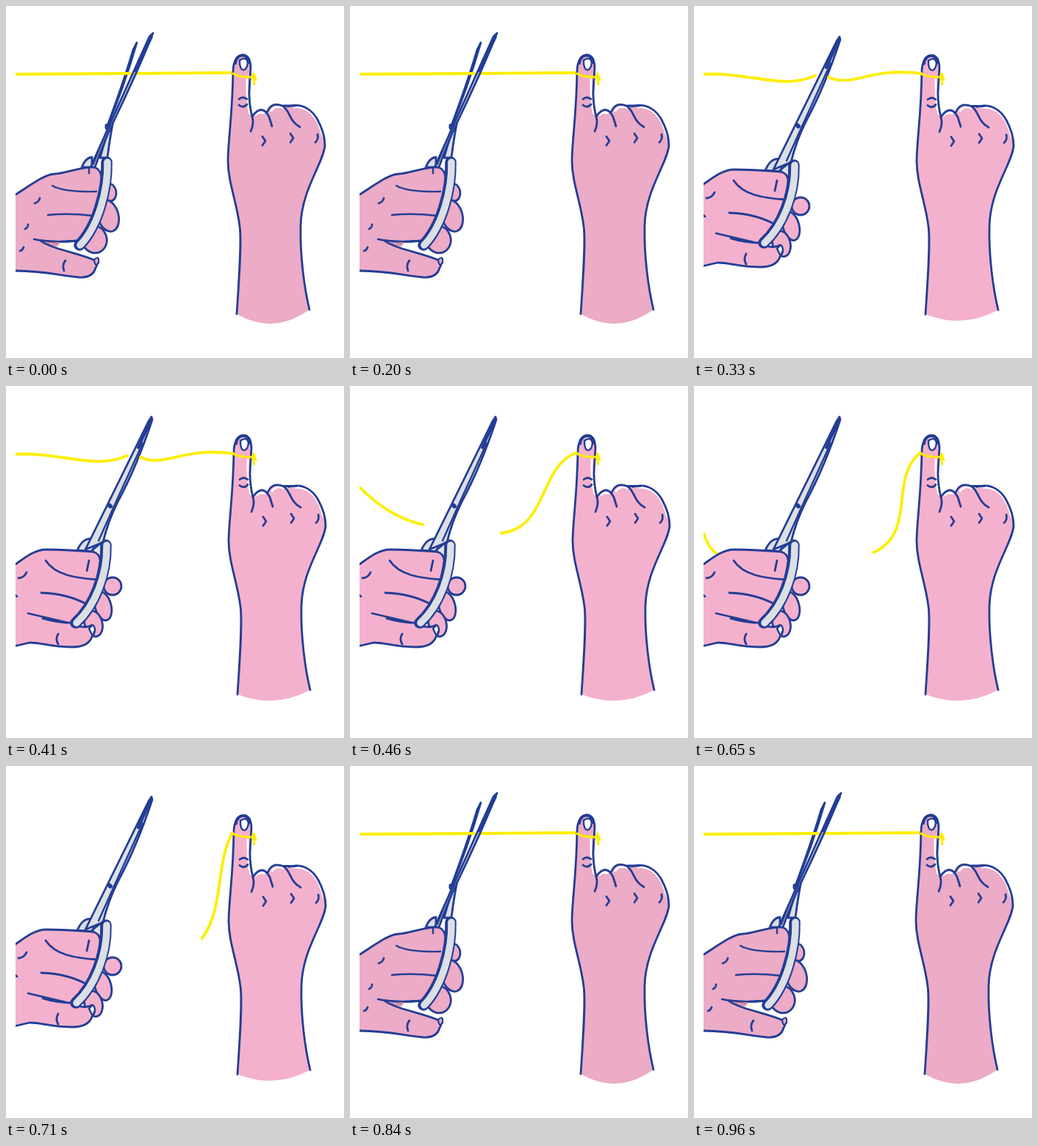
An HTML page that plays this animation: 460x480 px, repeating every 1.04 s.

```html
<!DOCTYPE html>
<html lang="en">
<head>
<meta charset="utf-8">
<title>Cutting the thread</title>
<style>
html, body { margin: 0; width: 100%; height: 100%; overflow: hidden; background: #fff; }
svg { display: block; width: 460px; height: 480px; stroke-linecap: round; stroke-linejoin: round; }
</style>
</head>
<body>
<svg viewBox="0 0 460 480">
  <defs><clipPath id="crop"><rect x="13" width="447" height="480"/></clipPath></defs>
  <g id="art" clip-path="url(#crop)"></g>
</svg>
<script>
const INK = '#233d94', STEEL = '#dcdfe5', YELLOW = '#fdee00';
const OPEN_SKIN = '#ecabc6', SHUT_SKIN = '#f4b1cd', SHADE = '#d08fac';

const line = (d, width = 2.8, color = INK) =>
  `<path d="${d}" fill="none" stroke="${color}" stroke-width="${width}"/>`;
const fill = (d, color) => `<path d="${d}" fill="${color}"/>`;
const shape = (d, color, width = 2.8) => fill(d, color) + line(d, width);
const thread = d => line(d, 3.8, YELLOW);

// Short bent stroke from (x, y) to (x + dx, y + dy).
const crease = (x, y, dx, dy, bend = 0) =>
  line(`M${x} ${y}q${dx / 2 - dy * bend} ${dy / 2 + dx * bend} ${dx} ${dy}`);

const finger = (x, y, rx, ry, turn, skin) =>
  `<ellipse cx="${x}" cy="${y}" rx="${rx}" ry="${ry}" transform="rotate(${turn} ${x} ${y})"
    fill="${skin}" stroke="${INK}" stroke-width="2.8"/>`;

// Steel band with an ink border, heavier on its inner side.
const grip = d =>
  line(d, 15.5) + `<g transform="translate(1 0)">${line(d, 9.5, STEEL)}</g>`;

function pointingHand(skin, bottom) {
  const left = 'M314 420C317 375 321 320 318 300C314 267 302 240 302 210C303 175 308 150 309 90';
  const tip = 'C309 60 333 60 333 84L331 118Q331 135 335 151';
  const knuckles = 'Q346 136 357 149Q358 126 384 137';
  const edge = 'C405 131 418 144 424 155C431 168 434 178 434 190C432 215 402 250 401 300C400 340 406 385 413 414';
  return fill(`${left}${tip}${knuckles}${edge}Q364 ${2 * bottom - 418} 314 420`, skin) +
    line('M328 100Q327 130 332 147M339 149Q344 144 351 146M361 143Q366 135 378 139M392 138Q421 136 431 178', 2.6, '#fff') +
    line(left + tip) +
    line('M384 137' + edge) +
    line('M333 171Q338 160 335 151Q348 132 358 151L362 164M355 146Q360 130 376 136C387 142 384 156 400 165M378 136L394 136') +
    line('M312 78C313 64 331 64 331 77', 4) +
    shape('M318 74C317 91 328 91 329 77Q327 68 318 74Z', '#fff', 2.4) +
    crease(317, 127, 11, 0, -0.4) + crease(317, 135, 11, -1, 0.5) +
    [[349, 178], [387, 174]].map(([x, y]) => line(`M${x} ${y}l4 6l-4 6`)).join('') +
    crease(424, 175, -3, 11, -0.3);
}

const knot = line('M309 92Q315 97 335 97L337 92L340 101M336 97L338 107', 3, YELLOW);

function openScissors(strand) {
  const skin = OPEN_SKIN;
  return finger(141, 254, 9, 12, -10, skin) +
    finger(139, 286, 14, 22, -15, skin) +
    finger(120, 318, 17, 19, -20, skin) +
    shape('M178 50Q159 115 137 166Q160 104 173 60Z', STEEL) +
    strand +
    shape('M147 152Q142 175 138 207H128Q135 180 147 152Z', STEEL) +
    shape('M103 220Q108 207 117 206V220Z', STEEL) +
    shape('M200 37Q181 85 150 150Q135 180 121 220H115L195 42Z', STEEL) +
    line('M198 42L176 88', 4) + line('M144 152L119 216', 2) + line('M137 163V166', 5) +
    shape('M10 259C30 247 50 230 66 229S105 218 120 220Q132 223 130 245C127 280 115 300 98 320Q70 323 47 320C65 332 95 336 119 346Q127 350 122 357Q118 371 100 370C70 367 50 361 10 361Z', skin) +
    fill('M50 321H76L68 329Z', SHADE) +
    shape('M120 346Q127 339 126 350Q121 357 120 346Z', skin, 2.2) +
    line('M38 318Q60 323 98 320M63 245Q78 254 123 253M57 285Q85 282 118 286M113 221V228', 2.4) +
    crease(46, 262, -7, 7, -0.3) + crease(30, 298, -4, 6, -0.3) +
    crease(24, 329, -5, 5, -0.3) + crease(81, 347, -2, 14, 0.3) +
    grip('M137 213C138 250 125 300 100 326');
}

function shutScissors() {
  const skin = SHUT_SKIN;
  return finger(145, 273, 12, 12, 0, skin) +
    finger(132, 300, 11, 20, -15, skin) +
    finger(119, 324, 12, 18, -15, skin) +
    shape('M97 224Q105 205 119 209V226Z', STEEL) +
    shape('M198 42L194 48L108 223L132 213Q139 184 152 158Q178 110 199 46Z', STEEL) +
    line('M198 44L180 84', 4) + line('M186 78L147 164L126 211', 2.4) + line('M141 163L142 164', 6) +
    shape('M117 224L132 212V238Z', STEEL) +
    shape('M10 245C25 235 38 223 55 223S105 225 118 226Q129 229 128 240C124 275 108 302 90 326Q110 331 117 326Q124 333 117 342Q112 356 90 356C60 356 50 350 32 350L10 355Z', skin) +
    line('M54 238C67 258 95 262 125 264M113 238L110 252M48 282Q82 283 109 297M30 310L90 324M50 317Q70 323 90 323') +
    crease(28, 254, -11, 8, -0.3) + crease(11, 284, 4, 3) + crease(71, 338, 0, 14, 0.3) +
    grip('M136 217C137 258 120 300 95 323') +
    shape('M113 331Q120 321 121 333L118 341Z', '#fff', 2.4);
}

// Threads just after the cut.
const slack = [
  'M11 93C80 90 120 115 165 95',
  'M183 97C215 112 240 83 309 92'
];

// The right end swings below the finger, its bend alternating.
function swing(k) {
  const a = (43 - 9 * k) * Math.PI / 180, len = 150;
  const ux = -Math.sin(a), uy = Math.cos(a), bend = 25 + 10 * Math.cos(Math.PI * k);
  const at = (along, off) => `${308 + len * along * ux + off * uy} ${91 + len * along * uy - off * ux}`;
  return `M${at(0, 0)}C${at(1 / 3, -bend * 0.7)} ${at(2 / 3, bend * 1.2)} ${at(1, 0)}`;
}

// The left end drops and slides out past the edge.
function slide(k) {
  if (k > 2) return '';
  const y = 138 + 25 * k ** 1.33, endX = 99 - 17 * k * k, endY = 189 + 20 * k;
  const sag = 15 / (k + 1);
  return `M13 ${y}Q${(13 + endX) / 2 - 3} ${(y + endY) / 2 + sag} ${endX} ${endY}`;
}

const taut = openScissors(thread('M11 93L169 92M175 92L309 91')) + pointingHand(OPEN_SKIN, 433.5) + knot;
const shut = shutScissors();
const shutHand = `<g transform="translate(1 .5)">${pointingHand(SHUT_SKIN, 429)}</g>`;
const cut = ([left, right]) => thread(left) + shut + shutHand + thread(right) + knot;

const LOOP = 1040, CUT = 330, RESET = 840;
const falls = [460, 520, 650, 710];

function scene(t) {
  if (t < CUT || t >= RESET) return taut;
  const k = falls.filter(start => t >= start).length - 1;
  return cut(k < 0 ? slack : [slide(k), swing(k)]);
}

const art = document.getElementById('art'), begin = performance.now();
let shown = '';
function tick() {
  const next = scene((performance.now() - begin) % LOOP);
  if (next !== shown) art.innerHTML = shown = next;
  requestAnimationFrame(tick);
}
tick();
</script>
</body>
</html>
```
